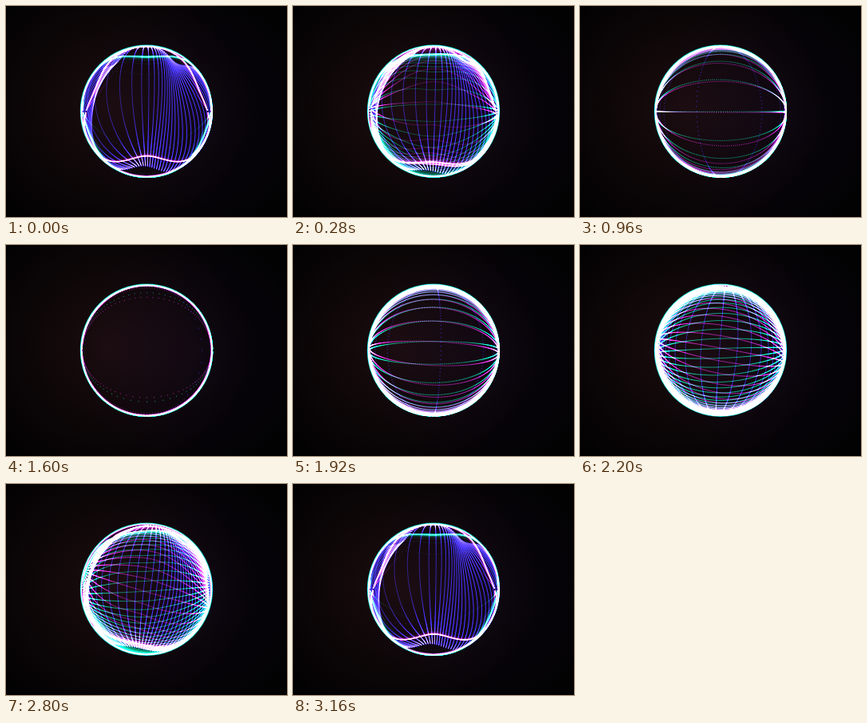
Recreate the animation shown at these times as an HTML page with a canvas. Size 352x264 px, loop 3200 ms.

```html
<!DOCTYPE html>
<html>
<head>
<meta charset="utf-8">
<style>
html, body { margin: 0; width: 100%; height: 100%; overflow: hidden; background: #050304; }
canvas { display: block; }
</style>
</head>
<body>
<canvas id="stage" width="352" height="264"></canvas>
<script>
const W = 352, H = 264, CX = 176, CY = 131.7;
const LOOP = 3200, STEP = 40, PEAK = 1420, TAU = Math.PI * 2;
const ROWS = 26, DOTS = 400, PITCH = 0.065;
const ctx = document.getElementById('stage').getContext('2d');
const image = ctx.createImageData(W, H);
const light = new Float32Array(W * H * 3);

// Each layer is a wavy grid of dots pressed onto a sphere.
// side: which way its lobes open at the swell (0 keeps a plain wave)
const layers = [
  { color: [0, 190, 145], radius: 82.3, side: -1, lobe: .6, lean: -.12, phase: .6,
    start: -.6, slide: 2, base: -3.3, rise: 5.2, width: 415, skew: -15, power: 3.5 },
  { color: [200, 35, 200], radius: 81.4, side: 1, lobe: 1, lean: .6, phase: 2.4,
    start: -.58, slide: 2, base: -3.3, rise: 5.8, width: 365, skew: -35, power: 2 },
  { color: [50, 40, 235], radius: 81.8, side: 0, lobe: 0, lean: .25, phase: .2,
    start: 1.3, slide: -2, base: -4.2, rise: 6.8, width: 570, skew: 10, power: 3 }
];

// Row spacing grows to a peak, then shrinks again
function rowGap(l, t) {
  const d = Math.abs(Math.sin(Math.PI * (t - PEAK) / LOOP)) * LOOP / Math.PI;
  const w = l.width + l.skew * Math.sin(TAU * (t - PEAK) / LOOP);
  return 2 ** (l.base + l.rise / (1 + (d / w) ** l.power));
}

function splat(x, y, c, k) {
  const ix = x | 0, iy = y | 0, fx = x - ix, fy = y - iy;
  const at = (iy * W + ix) * 3, below = at + W * 3;
  const a = (1 - fx) * (1 - fy) * k, b = fx * (1 - fy) * k;
  const d = (1 - fx) * fy * k, e = fx * fy * k;
  for (let j = 0; j < 3; j++) {
    light[at + j] += c[j] * a;
    light[at + 3 + j] += c[j] * b;
    light[below + j] += c[j] * d;
    light[below + 3 + j] += c[j] * e;
  }
}

function drawLayer(l, t) {
  const cos = Math.cos(TAU * t / LOOP), sin = Math.sin(TAU * t / LOOP);
  const swell = Math.max(0, cos) ** 3, calm = 1 - swell;
  const near = .5 + .5 * cos;
  const gap = rowGap(l, t), offset = l.start + l.slide * t / LOOP;
  const wave = .3 * near + (l.side ? 0 : .65 * swell);
  const turn = l.lean * near * (1 - sin) / 2 * calm;
  const co = Math.cos(turn), si = Math.sin(turn);
  const power = Math.min(.9, .3 + gap * 1.6) * (l.side ? 1 - .72 * swell : 1 - .2 * swell);
  for (let i = -ROWS; i <= ROWS; i++) {
    const u = (i + offset) * gap;
    for (let j = -DOTS; j <= DOTS; j++) {
      const v = j * PITCH * gap;
      const x = l.side ? v : u, y = l.side ? u : v;
      const r = Math.sqrt(u * u + v * v) + 1e-6;
      let z = 1 + wave * Math.sin(1.6 * (u + .35 * v) + l.phase);
      if (l.side) {
        const s = l.side * y / r;
        const lobe = (.5 + 2 * s * s * s - 1.5 * s) * (.7 + .35 * s) * l.lobe;
        z = z * calm + swell * (.06 + r * lobe);
      }
      const n = Math.sqrt(r * r + z * z), k = l.radius / n;
      splat(CX + (x * co - y * si) * k, CY + (x * si + y * co) * k,
        l.color, power * 1.4 / (1 + .4 * n));
    }
  }
}

function drawBack() {
  ctx.fillStyle = '#030203';
  ctx.fillRect(0, 0, W, H);
  ctx.globalCompositeOperation = 'lighter';
  const glow = (x, y, r, color) => {
    const g = ctx.createRadialGradient(x, y, 0, x, y, r);
    g.addColorStop(0, color);
    g.addColorStop(1, '#000');
    ctx.fillStyle = g;
    ctx.fillRect(0, 0, W, H);
  };
  glow(130, 125, 175, '#170a0b');
  glow(235, 135, 150, '#06030c');
}

function drawRing() {
  const ring = (r, width, color) => {
    ctx.strokeStyle = color;
    ctx.lineWidth = width;
    ctx.beginPath();
    ctx.arc(CX, CY, r, 0, TAU);
    ctx.stroke();
  };
  ring(82.2, 2, '#00c8a0');
  ring(81.2, 2, '#b02cb4');
  ring(81.8, 1.4, '#5038ff');
}

drawBack();
drawRing();
const base = ctx.getImageData(0, 0, W, H).data;

function draw(t) {
  light.fill(0);
  layers.forEach(l => drawLayer(l, t));
  for (let i = 0, j = 0; i < base.length; i += 4, j += 3) {
    const spill = Math.max(0, (light[j] + light[j + 1] + light[j + 2] - 600) * .1);
    for (let c = 0; c < 3; c++) image.data[i + c] = base[i + c] + light[j + c] + spill;
    image.data[i + 3] = 255;
  }
  ctx.putImageData(image, 0, 0);
}

let shown = -1;
function frame() {
  const t = Math.floor(performance.now() % LOOP / STEP) * STEP;
  if (t !== shown) draw(shown = t);
  requestAnimationFrame(frame);
}
frame();
</script>
</body>
</html>
```
